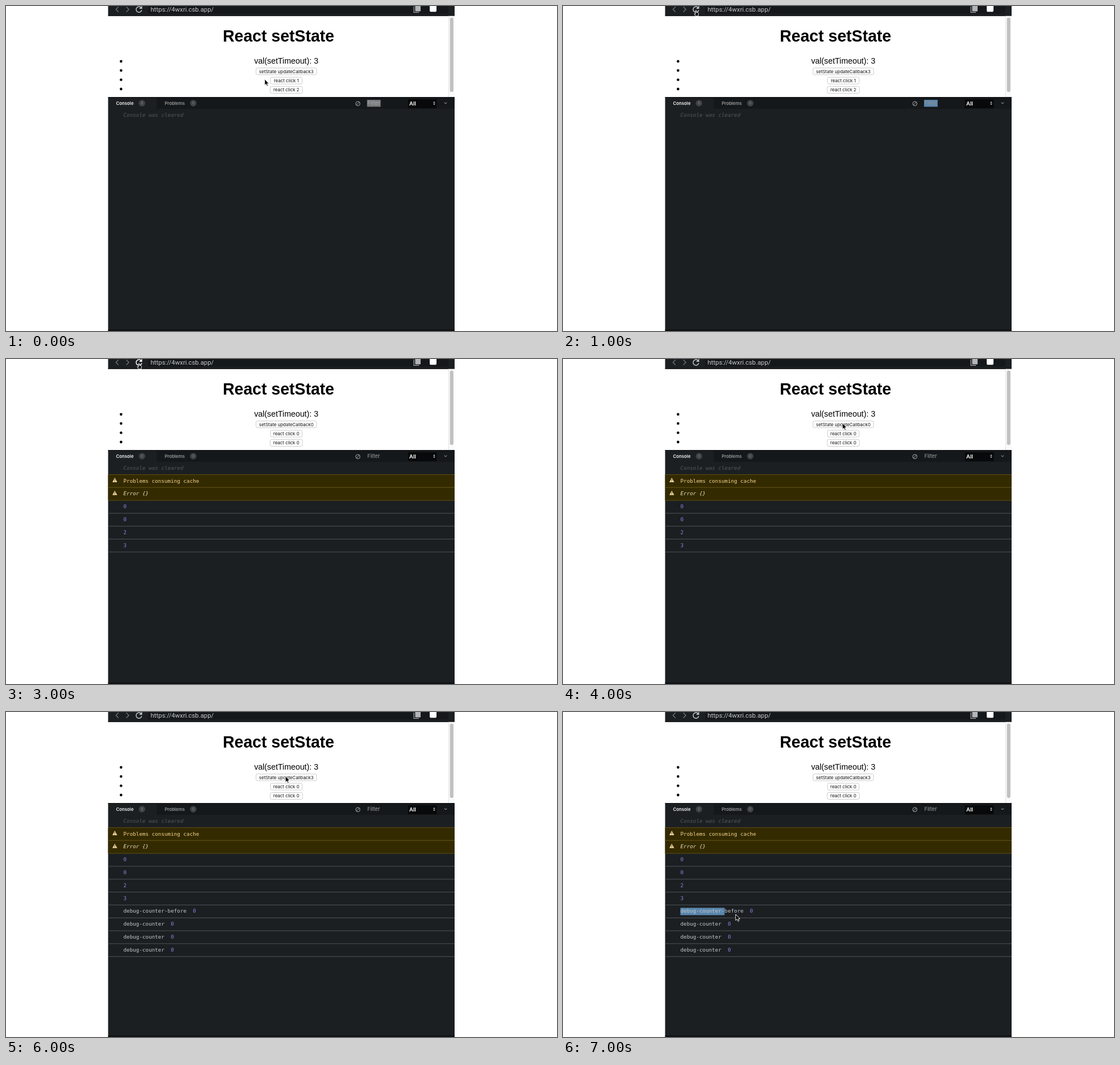
Recreate the animation shown at these times as an HTML page. Size 974 px wide and 575 px high, loop 8000 ms.

```html
<!DOCTYPE html>
<html lang="en">
<head>
<meta charset="utf-8">
<title>React setState</title>
<style>
html, body { margin: 0; width: 100%; height: 100%; overflow: hidden; background: #fff; }
svg { display: block; width: 974px; height: 575px; }
text { white-space: pre; }
.page { font-family: "Liberation Sans", Arial, sans-serif; fill: #000; text-anchor: middle; }
.btn { font: 7.95px Inter, sans-serif; fill: #111; text-anchor: middle; }
.tab { font: 600 7.85px Inter, sans-serif; }
.badge { font: 5.5px Inter, sans-serif; fill: #8b8e90; text-anchor: middle; }
.mono { font: 9.28px "DejaVu Sans Mono", monospace; }
.it { font-style: italic; }
</style>
</head>
<body>
<svg viewBox="0 0 974 575" xmlns="http://www.w3.org/2000/svg">
  <rect width="974" height="575" fill="#fff"/>

  <!-- address bar -->
  <rect x="180.5" width="612.5" height="17.5" fill="#1b1f22"/>
  <rect x="251" width="459" height="13.5" fill="#15181a"/>
  <rect x="710" width="72" height="13.5" fill="#15181a"/>
  <rect x="180.5" y="16.5" width="612.5" height="1.2" fill="#0c0e0f"/>
  <g fill="none" stroke="#75797c" stroke-width="1.2">
    <path d="M198.8 1.5L194.3 6L198.8 10.5"/>
    <path d="M212.7 1.5L217.2 6L212.7 10.5"/>
  </g>
  <g id="reload">
    <path d="M238.6 2.6A5 5 0 1 0 239.9 7.3" fill="none" stroke="currentColor" stroke-width="1.5"/>
    <path d="M240.6 -0.4V5H235.2Z" fill="currentColor"/>
  </g>
  <text x="255.6" y="9.8" font-family="Roboto, sans-serif" font-size="11.35" fill="#c6c8c9">https://4wxri.csb.app/</text>
  <path d="M721 1V11.3H730" fill="none" stroke="#a4a6a7" stroke-width="1.2"/>
  <rect x="723.3" y="-3" width="9.6" height="12.6" rx="1" fill="#b2b4b5"/>
  <rect x="749" y="-2" width="12" height="12.3" rx="2.6" fill="#fff"/>

  <!-- page -->
  <text class="page" x="481.7" y="63.3" font-size="28.6" font-weight="700">React setState</text>
  <text class="page" x="495.4" y="102" font-size="14.25">val(setTimeout): 3</text>
  <g id="list"></g>
  <rect x="782.5" y="17.7" width="10.5" height="143.5" fill="#fafafa"/>
  <path d="M782.5 17.7V161" stroke="#e4e4e4" stroke-width="1"/>
  <rect x="784.7" y="20.5" width="6.2" height="131.5" rx="3.1" fill="#c1c1c1"/>

  <!-- console -->
  <rect x="180.5" y="161" width="612.5" height="414" fill="#1b1f22"/>
  <rect x="266.5" y="161" width="526.5" height="21" fill="#15181a"/>
  <rect x="180.5" y="161" width="612.5" height="1.2" fill="#0e1011"/>
  <rect x="180.5" y="572.5" width="612.5" height="2.5" fill="#0e1112"/>
  <text class="tab" x="194.4" y="174.7" fill="#f2f2f2">Console</text>
  <text class="tab" x="280.4" y="174.7" fill="#969899">Problems</text>
  <circle cx="240.4" cy="172" r="5.7" fill="#404346"/>
  <text class="badge" x="240.4" y="174">0</text>
  <circle cx="331" cy="172" r="5.7" fill="#404346"/>
  <text class="badge" x="331" y="174">0</text>
  <g fill="none" stroke="#a9abac">
    <circle cx="622" cy="172.7" r="3.8"/>
    <path d="M619.4 175.4L624.7 170"/>
    <path d="M774.8 170.6L777 172.8L779.2 170.6" stroke="#c8c8c8"/>
  </g>
  <rect id="filterSel" x="638.3" y="166" width="24" height="12.3"/>
  <text id="filter" x="638.8" y="175.3" font-family="Inter, sans-serif" font-size="9.2" font-weight="500">Filter</text>
  <rect x="710.5" y="165" width="51" height="16" fill="#08090a"/>
  <text x="712.8" y="176.3" font-family="Inter, sans-serif" font-size="9.6" font-weight="600" fill="#fff">All</text>
  <path d="M755 171.3L756.9 169L758.8 171.3ZM755 172.7L756.9 175L758.8 172.7Z" fill="#d8d8d8"/>
  <text class="mono it" x="207.5" y="195.5" fill="#55595c">Console was cleared</text>
  <g id="log"></g>

  <path id="arrow" d="M0 0V11L2.5 8.7L4.2 12.6L6 11.8L4.4 8.1H7.6Z" fill="#000" stroke="#fff" stroke-width="0.9"/>
  <path id="hand" d="M234.2 12.6V8.2Q235 7 235.8 8.2V11L238.8 11.8Q239.8 12.2 239.6 13.4L238.8 17.8H234.4L232.2 14.2Q232.2 12.8 233.4 13.5L234.2 14.4Z" fill="#111" stroke="#fff" stroke-width="0.9"/>
</svg>
<script>
const $ = id => document.getElementById(id);
const STEP = 1000, STEPS = 8;
const BLUE = "#5a87ae", VIOLET = "#8d82dc", PLAIN = "#c6c8c9";
const ROW = 22.82, TOP = 204.5;

// one entry per console line: text, optional trailing value, warning flag
const LINES = [
  { text: "Problems consuming cache", fill: "#f5d48f", warn: true },
  { text: "Error {}", fill: "#eee0b8", warn: true, italic: true },
  ...[0, 0, 2, 3].map(n => ({ text: String(n), fill: VIOLET })),
  ...["-before", "", "", ""].map(s => ({ text: "debug-counter" + s, fill: PLAIN, value: 0 }))
];

// pointer tip from each step on; none means the hand is shown
function pointer(step) {
  if (step < 1) return [457.2, 129.3];
  if (step < 4) return null;
  return step < 7 ? [494, 113.4] : [305.2, 357.8];
}

function button(y, label, w) {
  return `<circle cx="203.4" cy="${y - 1.5}" r="2.3"/>
    <rect x="${495.5 - w / 2}" y="${y - 6}" width="${w}" height="12" rx="2.5" fill="#fff" stroke="#c6c6c6" stroke-width="0.9"/>
    <text class="btn" x="495.5" y="${y + 2.9}">${label}</text>`;
}

function list(step) {
  const fresh = step >= 3;
  const calls = fresh && step < 6 ? 0 : 3;
  return `<circle cx="203.4" cy="97.9" r="2.3"/>` +
    button(115.6, "setState updateCallback" + calls, 107) +
    button(132, "react click " + (fresh ? 0 : 1), 56) +
    button(148.4, "react click " + (fresh ? 0 : 2), 57);
}

function line(l, i, marked) {
  const y = TOP + i * ROW, base = y + 14;
  let s = "";
  if (l.warn) {
    s += `<rect x="180.5" y="${y}" width="612.5" height="${ROW}" fill="#332a00"/>
      <path d="M180.5 ${y}H793" stroke="#5e4f14"/>
      <path d="M192.3 ${y + 5.6}L196.6 ${y + 13.4}H188Z" fill="#f2d7a0"/>
      <path d="M192.3 ${y + 8}V${y + 10.6}M192.3 ${y + 11.3}V${y + 12.3}" stroke="#332a00" stroke-width="0.9"/>`;
  }
  s += `<path d="M180.5 ${y + ROW}H793" stroke="${l.warn ? "#5e4f14" : "#505457"}"/>`;
  if (marked) s += `<rect x="207.5" y="${y + 5}" width="78" height="13" fill="${BLUE}"/>`;
  const val = l.value === undefined ? "" : `  <tspan fill="${VIOLET}">${l.value}</tspan>`;
  return s + `<text class="mono${l.italic ? " it" : ""}" x="207.5" y="${base}" fill="${l.fill}">${l.text}${val}</text>`;
}

let shown = -1;
function draw(t) {
  const step = Math.floor(t / STEP) % STEPS;
  if (step === shown) return;
  shown = step;
  const count = step < 3 ? 0 : step < 6 ? 6 : 10;
  $("list").innerHTML = list(step);
  $("log").innerHTML = LINES.slice(0, count).map((l, i) => line(l, i, step === 7 && i === 6)).join("");
  $("reload").setAttribute("color", step === 2 || step === 3 ? "#fff" : "#c2c4c5");
  $("filterSel").setAttribute("fill", ["#77797a", BLUE][step] || "none");
  $("filter").setAttribute("fill", step === 0 ? "#a3a5a6" : "#8f9192");
  const tip = pointer(step);
  $("arrow").style.display = tip ? "" : "none";
  $("hand").style.display = tip ? "none" : "";
  if (tip) $("arrow").setAttribute("transform", `translate(${tip})`);
}

const start = performance.now();
function tick() {
  draw(performance.now() - start);
  requestAnimationFrame(tick);
}
tick();
</script>
</body>
</html>
```
